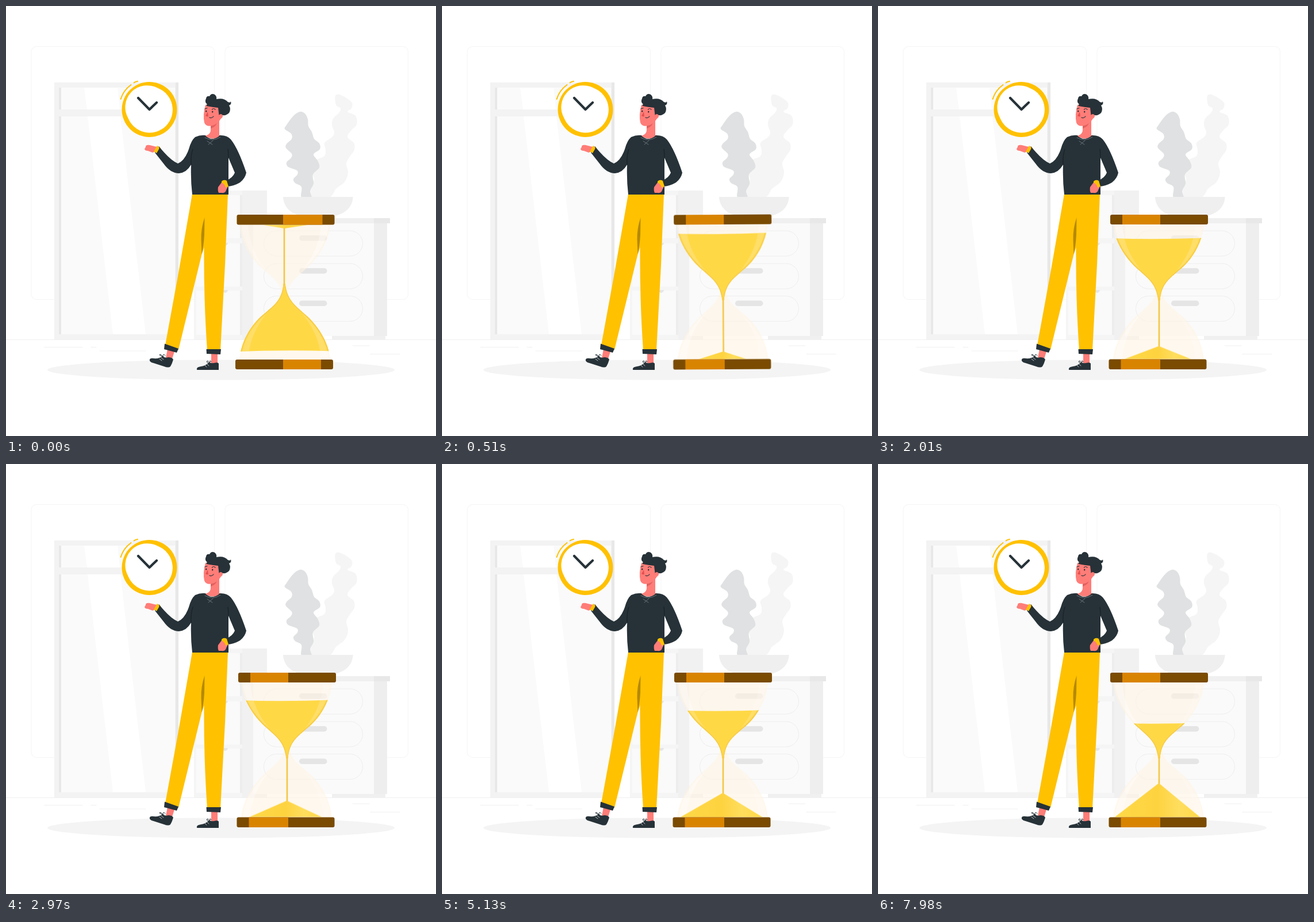
These frames come from a looping animation (748 px wide and 748 px high, 8 s). An HTML page:

```html
<!DOCTYPE html>
<html lang="en">
<head>
<meta charset="utf-8">
<title>Hourglass</title>
<style>
html, body { margin: 0; width: 100%; height: 100%; overflow: hidden; background: #fff; }
svg { display: block; width: 100%; height: 100%; }
.line { fill: none; stroke-linecap: round; stroke-linejoin: round; }
.dark { fill: #263238; }
.skin { fill: #ff7d78; }
.gold { fill: #ffc100; }
#hourglass { transform-origin: 486.5px 497.5px; animation: turn 8s infinite; }
#level { animation: drain 8s linear infinite; }
#pile { transform-origin: 488.5px 614px; animation: grow 8s linear infinite; }
@keyframes turn {
  0% { transform: rotate(180deg); animation-timing-function: ease-in-out; }
  6.6%, 100% { transform: rotate(360deg); }
}
@keyframes drain {
  0% { transform: translateY(0); }
  6.375% { transform: translateY(1px); }
  25.125% { transform: translateY(9.5px); }
  48.75% { transform: translateY(23px); }
  64.125% { transform: translateY(34px); }
  83.625% { transform: translateY(46px); }
  100% { transform: translateY(56px); }
}
@keyframes grow {
  0% { transform: scale(.52, .1); }
  6.375% { transform: scale(.55, .22); }
  25.125% { transform: scale(.78, .38); }
  48.75% { transform: scale(.92, .58); }
  64.125% { transform: scale(.96, .71); }
  83.625% { transform: scale(1, .88); }
  100% { transform: scale(1, 1); }
}
</style>
</head>
<body>
<svg viewBox="0 0 748 748">
  <defs>
    <path id="bulb" d="M409 380C412 412 432 440 451 457S484 483 487.500 512H490.500C493 483 507 474 527 457S564 412 567 380Z"/>
    <clipPath id="inBulb"><use href="#bulb"/></clipPath>
    <clipPath id="inDome"><use href="#bulb" transform="matrix(1 0 0 -1 0 995)"/></clipPath>
    <clipPath id="belowLevel"><path id="level" d="M400 394.500Q488 397.500 580 393.500V545H400Z"/></clipPath>
    <linearGradient id="pileTone">
      <stop offset="0" stop-color="#ffd948"/>
      <stop offset=".5" stop-color="#fed340"/>
      <stop offset=".75" stop-color="#ffde5e"/>
      <stop offset="1" stop-color="#ffd948"/>
    </linearGradient>
    <path id="leftShine" d="M412 380C415 412 434 440 458 460C439 437 427 412 425 380Z"/>
    <path id="rightShine" d="M564 380C561 412 544 440 520 460C538 437 550 412 552 380Z"/>
    <g id="glass">
      <use href="#bulb" fill="#fff3e2" fill-opacity=".58"/>
      <use href="#leftShine" fill="#fff" fill-opacity=".35"/>
      <use href="#rightShine" fill="#fff" fill-opacity=".2"/>
    </g>
  </defs>

  <!-- room -->
  <g class="line" stroke="#f5f5f5">
    <rect x="44" y="70.500" width="318.500" height="440" rx="8.900"/>
    <rect x="381" y="70.500" width="318.500" height="440" rx="8.900"/>
    <path stroke="#f0f0f0" d="M0 580.500H748M67 593.500H133M148 593.500H157M163 600H243M603 591H632M634 605.500H685"/>
  </g>

  <!-- wardrobe -->
  <path fill="#f3f3f3" d="M84 133H300V580H84Z"/>
  <path fill="#e8e8e8" d="M92 142H96V180H92ZM92 192H96V571H92ZM295 133H300V580H295Z"/>
  <path fill="#fafafa" d="M96 142H294V180H96ZM96 192H294V571H96Z"/>
  <path fill="#fff" d="M136 142H194L198 180H141ZM142 192H199L243 571H186Z"/>

  <!-- cabinet -->
  <path fill="#f5f5f5" d="M327 321H454V580H327Z"/>
  <path fill="#fafafa" d="M331 329H407V404H331ZM331 413H407V488H331ZM331 495H407V572H331Z"/>
  <path fill="#ededed" d="M407 329H411V404H407ZM407 413H411V488H407ZM407 495H411V572H407Z"/>
  <path fill="#f1f1f1" d="M411 321H454V580H411Z"/>
  <path fill="#e6e6e6" d="M376 412A5 5 0 0 0 386 412ZM376 494A5 5 0 0 0 386 494Z"/>

  <!-- plants and bowl -->
  <path id="tallPlant" fill="#f5f5f5"/>
  <path id="shortPlant" fill="#e0e1e2"/>
  <path fill="#efefef" d="M482 332H603.500C603 350 590 361 572 365H513C495 361 483 350 482 332Z"/>

  <!-- dresser -->
  <path fill="#f0f0f0" d="M404 369H640V378H404ZM567 574H660V580H567Z"/>
  <path fill="#fafafa" d="M430 378H640V574H430Z"/>
  <path fill="#eee" d="M640 378H663V574H640Z"/>
  <path fill="#e8e8e8" d="M640 369H668V378H640Z"/>
  <g id="drawers"></g>

  <ellipse cx="374" cy="633" rx="302" ry="17.600" fill="#f4f4f4"/>

  <!-- clock -->
  <circle cx="249.500" cy="180" r="48" fill="#ffc100"/>
  <circle cx="249.500" cy="180" r="40" fill="#ffeab0"/>
  <path fill="#fff" d="M213 196A38 38 0 0 1 264 143A40 40 0 1 1 213 196Z"/>
  <path class="line" stroke="#263238" stroke-width="4.200" d="M230 160L249.500 180L262 168"/>
  <path class="line" stroke="#ffc100" stroke-width="2" d="M199.500 162Q204 147 217.500 137M222.500 133.500Q225 131.500 229 131"/>

  <!-- legs -->
  <path class="skin" d="M281 597L293 601L289 614L278 612ZM357 604H368V622H357Z"/>
  <path class="dark" d="M250 615Q251 612 257 613Q266 614 273 609Q276 613 282 611Q289 611 291 615Q289 622 286 627Q283 630 275 627L253 620Q249 618 250 615Z"/>
  <path class="dark" d="M332 631Q332 628 339 627Q347 626 353 620Q357 622 362 621Q369 619 370 622V633H334Q331 633 332 631Z"/>
  <path class="line" stroke="#263238" d="M274 611L267 607Q268 604 273 610Q273 603 277 608M354 622L349 619Q350 615 355 621Q354 614 357 619"/>
  <path class="line" stroke="#fff" stroke-width=".7" d="M267 614L271 617M270 612L274 615M346 625L349 628M350 623L353 626"/>
  <path class="gold" d="M324 327H386L381 450L373 599H350Q344 515 344.500 420L340.500 432L300 598L277 590L299 470Z"/>
  <path fill="#b58900" d="M345.500 368Q339 387 339.500 407L340.500 432Q344 417 345 398Z"/>
  <path class="dark" d="M276 587.500L300 596L297 603L275 597ZM348.500 597H374L373 606L349 605Z"/>

  <!-- hands, arms and sweater -->
  <path class="skin" d="M262 245L250 242Q243 241 243 245L241 249Q242 252 247 252L255 255L262 252Z"/>
  <path class="dark" d="M329 228Q338 224 347 225Q358 237 371 225Q384 224 391 232Q404 248 418 290Q416 300 407 307Q397 313 385 314L383 304Q395 298 398 290L387 264V328H324Q321 303 322 276Q314 290 301 291Q286 291 274 274Q266 264 259 255L266 244Q285 268 299 274Q311 269 318 249Q322 234 329 228Z"/>
  <path class="line" stroke="#11191d" stroke-width=".8" d="M322 276Q321 260 325 249M387 264Q387 255 386 249"/>
  <path class="gold" d="M257 253L263 243Q268 245 266 249L262 256Z"/>
  <path class="skin" d="M375 307Q381 306 386 314L383 320Q382 326 375 325H370Q368 321 369 315Z"/>
  <path class="gold" d="M375 305Q379 301 384 304L387 314L382 316Q380 308 375 308Z"/>
  <path class="line" stroke="#68757b" d="M346 229Q359 237 373 228M350 235L359 241M360 234L352 241"/>

  <!-- head -->
  <path class="skin" d="M356 200L371 187V226Q360 235 347 226Q356 223 356 216Z"/>
  <path fill="#e3605e" d="M356 207Q365 205 369 197Q367 210 356 213Z"/>
  <path class="skin" d="M347 172Q360 169 373 173L377 188Q374 201 362 207Q349 212 345 203Q342 190 347 172Z"/>
  <path class="dark" d="M349 174Q348 172 350 171Q345 167 348 161Q349 156 354 157Q357 151 363 154Q367 157 366 162Q379 159 386 167Q390 169 391 166Q393 171 388 173Q392 179 388 186Q383 191 377 190L371 194L369 177Q359 176 349 174Z"/>
  <path class="skin" d="M370 190Q374 186 377 190Q378 195 371 197Z"/>
  <path class="line" stroke="#263238" stroke-width="1.200" d="M346 179L350 177.500M358.500 180Q361 177 364 180M354 194Q358 196 361 192"/>
  <path class="dark" d="M347 183a1.200 1.600 0 1 0 2.400 0a1.200 1.600 0 1 0-2.400 0M358 184a1.200 1.600 0 1 0 2.400 0a1.200 1.600 0 1 0-2.400 0"/>
  <path fill="#e3504f" d="M351 184L347 191Q349 193 352 192Z"/>

  <g id="hourglass">
    <use href="#glass"/>
    <use href="#glass" transform="matrix(1 0 0 -1 0 995)"/>
    <path class="line" stroke="#f5c544" stroke-width="2.600" d="M489 506V611"/>
    <g clip-path="url(#belowLevel)">
      <use href="#bulb" fill="#ffd846"/>
      <use href="#leftShine" fill="#ffe68c" fill-opacity=".5"/>
      <use href="#rightShine" fill="#ffe68c" fill-opacity=".5"/>
      <g clip-path="url(#inBulb)" class="line">
        <use href="#bulb" stroke="#f6ca48" stroke-width="3"/>
      </g>
    </g>
    <g clip-path="url(#inDome)">
      <path id="pile" fill="url(#pileTone)" d="M488.500 555L412 614H560Z"/>
    </g>
    <g id="plates"></g>
  </g>
</svg>
<script>
const byId = id => document.getElementById(id);

// Closed Catmull-Rom curve through "x,y" points.
function smoothLoop(text) {
  const points = text.split(' ').map(pair => pair.split(',').map(Number));
  const at = i => points[(i + points.length) % points.length];
  const control = (p, a, b) => p.map((v, k) => v + (b[k] - a[k]) / 6);
  return 'M' + at(0) + points.map((p, i) => {
    const next = at(i + 1);
    return `C${control(p, at(i - 1), next)} ${control(next, at(i + 2), p)} ${next}`;
  }).join('') + 'Z';
}

byId('shortPlant').setAttribute('d', smoothLoop(
  '511,184 500,191 488,207 485,214 496,222 497,231 488,240 487,247 497,257 496,264 488,272 491,280 506,286 507,293 500,301 503,308 514,315 514,333 531,333 529,322 535,309 534,293 545,281 542,269 535,258 546,249 545,239 536,231 532,219 526,209 525,197 520,187'));
byId('tallPlant').setAttribute('d', smoothLoop(
  '573,156 583,155 601,167 601,178 594,184 608,191 610,206 600,217 594,228 605,238 606,250 598,262 592,274 595,290 589,306 574,318 562,333 529,333 530,316 536,302 534,291 545,280 541,268 554,261 556,250 554,238 567,228 571,220 567,207 569,196 579,186 582,178 574,172'));

byId('drawers').innerHTML = [391, 448, 504.5].map(y => `
  <rect x="448.5" y="${y}" width="172" height="44" rx="22" fill="none" stroke="#eee"/>
  <rect x="510" y="${y + 8}" width="48.500" height="9.500" rx="4.700" fill="#e5e5e5"/>`).join('');

const plate = (x, y, height) => `
  <rect x="${x}" y="${y}" width="170" height="${height}" rx="3" fill="#7a4b00"/>
  <rect x="${x + 21}" y="${y}" width="${491 - x - 21}" height="${height}" fill="#d98400"/>`;
byId('plates').innerHTML = plate(404, 363, 17) + plate(401.5, 614.5, 17.5);
</script>
</body>
</html>
```
